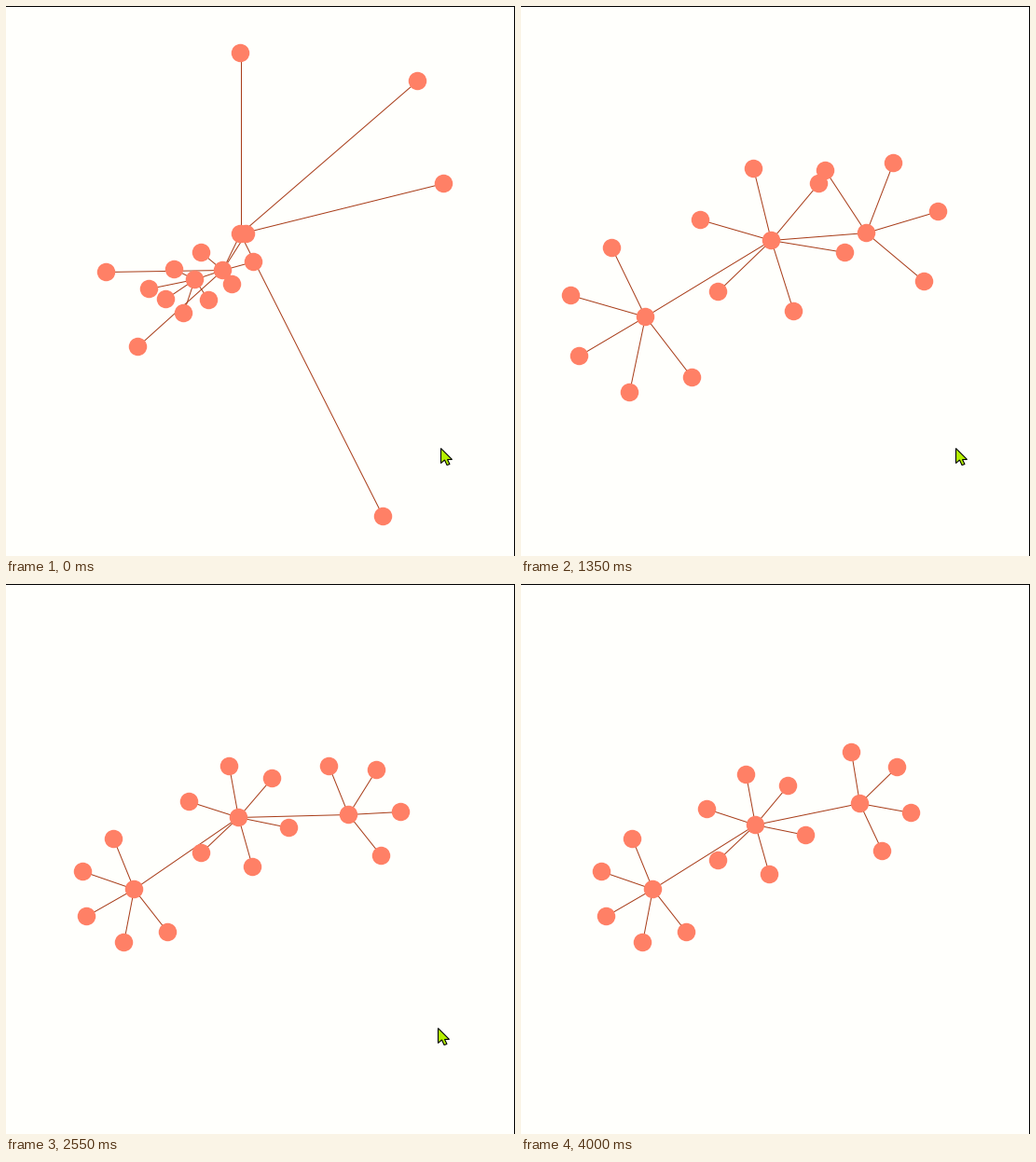
These frames come from a looping animation (546x590 px, 4700 ms). A matplotlib script:

```python
import numpy as np
import matplotlib.pyplot as plt
from matplotlib.animation import FuncAnimation
from matplotlib.collections import LineCollection
from matplotlib.patches import Polygon, Rectangle

WIDTH, HEIGHT, DPI = 546, 590, 100
STEP, FRAMES = 50, 94
START, END = 400, 4000
PX = 72 / DPI

PAPER, CORAL, BROWN, LIME = "#fffffc", "#ff8066", "#a83c18", "#b4f000"

CURSOR_TIMES = [2450, 2550, 2700, 3300, 3750]
CURSOR_PATH = [466 + 474j, 463 + 476j, 463 + 476j, 480 + 542j, 496 + 592j]
ARROW = np.array([0, 16j, 4 + 12.5j, 6.5 + 18j, 9.5 + 17j, 7 + 12j, 12 + 12j])

HUB_TIMES = np.array([START, 650, 1050, 1650, 2550, END])


def xy(z):
    """Turn complex positions into x, y pairs."""
    return np.stack([np.real(z), np.imag(z)], axis=-1)


def pulse(s, peak, power):
    """Rise from 0 to 1 at the peak time, then die away."""
    x = s / peak
    return (x * np.exp(1 - x)) ** power


class Branch:
    """A hub on a smooth path; its leaves burst out and settle in an even fan."""

    def __init__(self, hub_path, leaves, first, spacing, radius, swing=0.0):
        self.path = np.array(hub_path)
        self.slopes = np.gradient(self.path, HUB_TIMES)
        self.radius, self.swing = radius, swing
        self.rest = np.radians(first + spacing * np.arange(len(leaves)))
        offset = np.array(leaves) - self.path[0]
        self.stretch = np.abs(offset) - radius
        self.turn = np.angle(offset * np.exp(-1j * self.rest))

    def hub(self, t):
        k = min(np.searchsorted(HUB_TIMES, t, side="right"), len(HUB_TIMES) - 1) - 1
        span = HUB_TIMES[k + 1] - HUB_TIMES[k]
        u = (t - HUB_TIMES[k]) / span
        ease = u * u * (3 - 2 * u)
        bend = (1 - u) * self.slopes[k] - u * self.slopes[k + 1]
        return ((1 - ease) * self.path[k] + ease * self.path[k + 1]
                + span * u * (1 - u) * bend)

    def positions(self, t):
        s = t - START
        angle = self.rest + self.turn * np.exp(-s / 400) + self.swing * pulse(s, 1200, 3)
        reach = self.radius + self.stretch * np.exp(-s / 150) + 60 * pulse(s, 420, 2)
        hub = self.hub(t)
        return np.append(hub, hub + reach * np.exp(1j * angle))


middle = Branch(
    [232 + 283j, 207 + 304j, 286 + 255j, 231 + 258j, 249 + 250j, 251 + 258j],
    [257 + 244j, 265 + 274j, 242 + 298j, 141 + 365j, 107 + 285j, 209 + 264j],
    first=-50, spacing=62, radius=55)
right = Branch(
    [251 + 244j, 283 + 177j, 361 + 237j, 361 + 237j, 367 + 247j, 363 + 235j],
    [251 + 50j, 441 + 80j, 469 + 190j, 404 + 547j],
    first=-97, spacing=54.5, radius=56, swing=-0.5)
left = Branch(
    [202 + 293j, 207 + 272j, 169 + 328j, 104 + 325j, 137 + 327j, 141 + 327j],
    [217 + 315j, 190 + 329j, 171 + 314j, 153 + 303j, 180 + 282j],
    first=52, spacing=49, radius=58)
branches = [middle, right, left]

edges, base = [], 0
for branch in branches:
    if base:
        edges.append((0, base))
    count = len(branch.rest)
    edges += [(base, base + i) for i in range(1, count + 1)]
    base += count + 1
edges = np.array(edges)

fig = plt.figure(figsize=(WIDTH / DPI, HEIGHT / DPI), dpi=DPI, facecolor=PAPER)
ax = fig.add_axes([0, 0, 1, 1])
ax.set_xlim(0, WIDTH)
ax.set_ylim(HEIGHT, 0)
ax.axis("off")

for corner, w, h in [((0, 0), WIDTH, 1), ((WIDTH - 1, 0), 1, HEIGHT)]:
    ax.add_patch(Rectangle(corner, w, h, fc="black", lw=0))
links = LineCollection([], colors=BROWN, linewidths=PX, zorder=2)
ax.add_collection(links)
nodes, = ax.plot([], [], "o", ms=19.5 * PX, mfc=CORAL, mew=0, zorder=3)
cursor = Polygon(xy(ARROW), closed=True, fc=LIME, ec="black", lw=1.1 * PX,
                 joinstyle="miter", zorder=4)
ax.add_patch(cursor)


def draw(frame):
    t = frame * STEP
    moved = np.clip(t, START, END)
    pos = np.round(xy(np.concatenate([b.positions(moved) for b in branches])))
    tip = np.round(np.interp(t, CURSOR_TIMES, CURSOR_PATH))
    links.set_segments(pos[edges] + 0.5)
    nodes.set_data(pos[:, 0], pos[:, 1])
    cursor.set_xy(xy(ARROW + tip) + 0.5)
    return links, nodes, cursor


anim = FuncAnimation(fig, draw, frames=FRAMES, interval=STEP, repeat=True,
                     repeat_delay=0)
plt.show()
```
